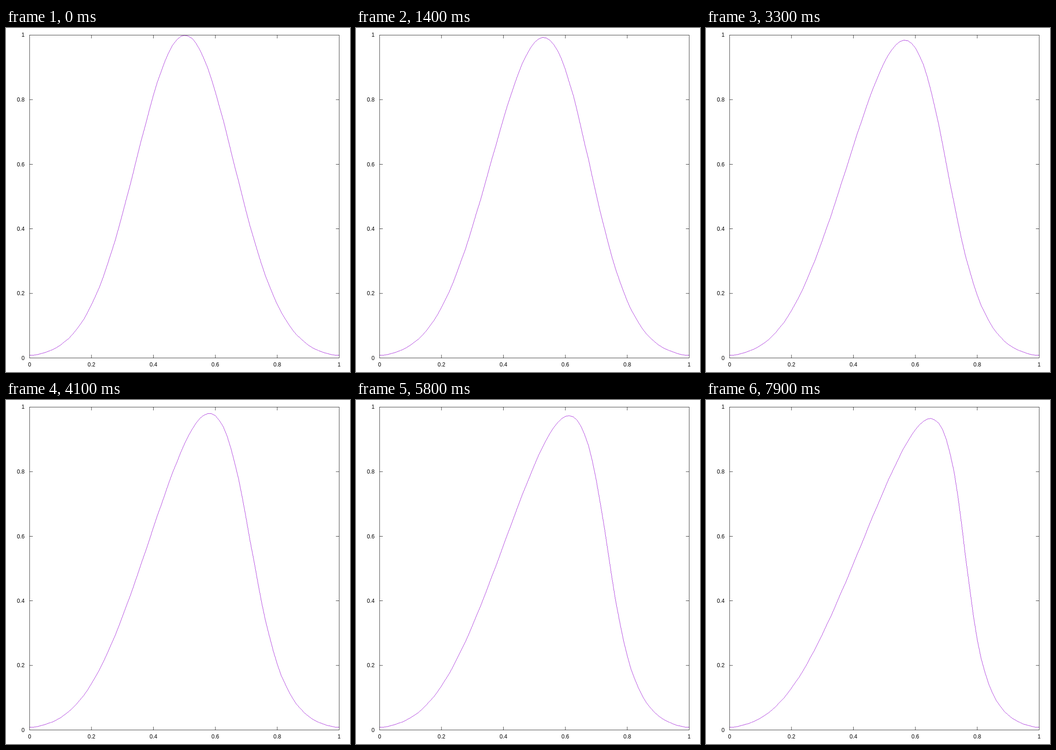
Write an HTML page with a canvas that moves like this. It is 748 px wide and 748 px high and loops after 8 s.

```html
<!DOCTYPE html>
<html lang="en">
<head>
<meta charset="utf-8">
<title>Steepening wave</title>
<style>
html, body { margin: 0; width: 100%; height: 100%; overflow: hidden; background: #fff; }
canvas { display: block; width: 748px; height: 748px; }
</style>
</head>
<body>
<canvas id="plot" width="748" height="748"></canvas>
<script>
const ctx = document.getElementById('plot').getContext('2d');

// The plot is laid out on a 1000 px grid and shrunk to the stage
const SIZE = 1000;
const LEFT = 68, RIGHT = 968, TOP = 20, BOTTOM = 959, TICK = 9;
const CELLS = 80, FRAMES = 80, FRAME_MS = 100;
const STEP = 0.0002, STEPS_PER_FRAME = 10;

const px = x => Math.round(LEFT + x * (RIGHT - LEFT));
const py = u => BOTTOM - Math.round(u * (BOTTOM - TOP));

// Burgers' equation u_t + u u_x = 0, first-order upwind, zero-gradient ends
function advance(u) {
  const k = STEP * CELLS;
  for (let s = 0; s < STEPS_PER_FRAME; s++) {
    for (let i = CELLS - 1; i > 0; i--) u[i] -= k * u[i] * (u[i] - u[i - 1]);
    closeEnds(u);
  }
}

function closeEnds(u) {
  u[0] = u[1];
  u[CELLS] = u[CELLS - 1];
}

function solve() {
  const u = Array.from({ length: CELLS + 1 }, (_, i) => Math.exp(-20 * (i / CELLS - 0.5) ** 2));
  closeEnds(u);
  const states = [];
  for (let n = 0; n < FRAMES; n++) {
    advance(u);
    states.push(u.slice());
  }
  return states;
}

const dot = (x, y) => ctx.rect(x, y, 1, 1);

// Adds a stepped line, one grid pixel wide, to the current path
function line(x0, y0, x1, y1) {
  const dx = Math.abs(x1 - x0), dy = Math.abs(y1 - y0);
  if (dy <= dx) {
    if (x0 > x1) [x0, y0, x1, y1] = [x1, y1, x0, y0];
    const dir = Math.sign(y1 - y0);
    for (let k = 0; k <= dx; k++) dot(x0 + k, y0 + dir * Math.floor((2 * k * dy + dx) / (2 * dx || 1)));
  } else {
    if (y0 > y1) [x0, y0, x1, y1] = [x1, y1, x0, y0];
    const dir = Math.sign(x1 - x0);
    for (let k = 0; k <= dy; k++) dot(x0 + dir * Math.floor((2 * k * dx + dy) / (2 * dy)), y0 + k);
  }
}

// Inclusive box of grid pixels
const bar = (x0, y0, x1, y1) => ctx.rect(x0, y0, x1 - x0 + 1, y1 - y0 + 1);

function drawAxes() {
  ctx.fillStyle = '#000';
  ctx.font = '16px "Liberation Sans", Arial, sans-serif';
  ctx.beginPath();
  for (let k = 0; k <= 5; k++) {
    const x = px(k / 5), y = py(k / 5), label = String(k / 5);
    bar(LEFT, y, LEFT + TICK, y);
    bar(RIGHT - TICK, y, RIGHT, y);
    bar(x, TOP, x, TOP + TICK);
    bar(x, BOTTOM - TICK, x, BOTTOM);
    ctx.textAlign = 'right';
    ctx.fillText(label, 54, y + 6);
    ctx.textAlign = 'center';
    ctx.fillText(label, x + 0.5, 984);
  }
  bar(LEFT, TOP, RIGHT, TOP);
  bar(LEFT, BOTTOM, RIGHT, BOTTOM);
  bar(LEFT, TOP, LEFT, BOTTOM);
  bar(RIGHT, TOP, RIGHT, BOTTOM);
  ctx.fill();
}

function drawCurve(u) {
  ctx.fillStyle = '#9400d3';
  ctx.beginPath();
  for (let i = 0; i < CELLS; i++) {
    line(px(i / CELLS), py(u[i]), px((i + 1) / CELLS), py(u[i + 1]));
  }
  ctx.fill();
}

const states = solve();
const start = performance.now();
ctx.scale(748 / SIZE, 748 / SIZE);

function draw(now) {
  const frame = Math.floor(Math.max(0, now - start) / FRAME_MS) % FRAMES;
  ctx.fillStyle = '#fff';
  ctx.fillRect(0, 0, SIZE, SIZE);
  drawCurve(states[frame]);
  drawAxes();
  requestAnimationFrame(draw);
}
draw(start);
</script>
</body>
</html>
```
